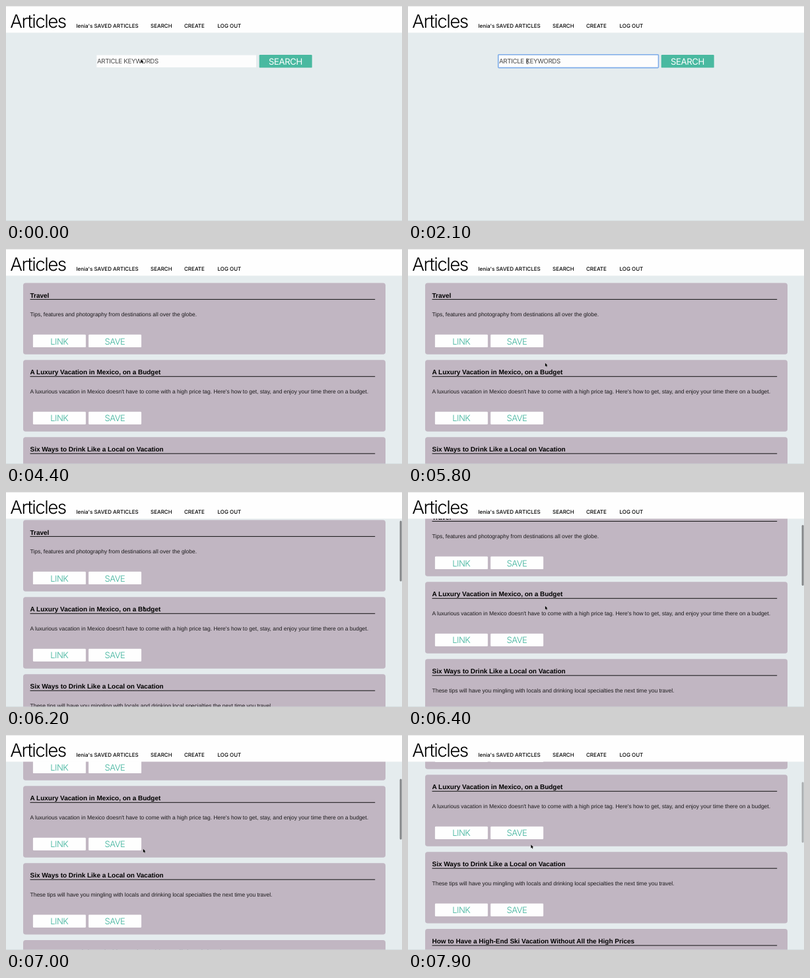
An HTML page that plays this animation: 600 by 326 pixels, repeating every 8 s.

```html
<!DOCTYPE html>
<html lang="en">
<head>
<meta charset="utf-8">
<title>Articles</title>
<style>
  html, body { margin: 0; width: 100%; height: 100%; overflow: hidden; background: #e5ecee; }
  svg { display: block; width: 100vw; height: 100vh; }
  text { font-family: Inter, Roboto, sans-serif; text-rendering: geometricPrecision; white-space: pre; }
  .logo { font-size: 27.8px; font-weight: 300; letter-spacing: -1.5px; }
  .nav { font-size: 8px; font-weight: 450; }
  .field { font-size: 9.7px; letter-spacing: -.33px; }
  .button { font-size: 13.2px; letter-spacing: -.45px; text-anchor: middle; }
  .card .button { fill: #3cb29b; font-size: 13px; letter-spacing: -.5px; font-weight: 350; }
  .title { font: bold 10px "Liberation Sans", Arial, sans-serif; letter-spacing: -.02px; }
  .text { font: 8.5px "Liberation Sans", Arial, sans-serif; letter-spacing: -.02px; fill: #1c1a1c; }
</style>
</head>
<body>
<svg viewBox="0 0 600 326">
  <rect width="600" height="326" fill="#e5ecee"/>
  <g id="search">
    <rect x="137.3" y="74.5" width="241.7" height="18.5" fill="#fdfdfd"/>
    <rect id="ring" x="136.7" y="73.8" width="242.8" height="19.8" rx="1" fill="none" stroke="#7fade9" stroke-width="1.6"/>
    <text id="hint" class="field" x="138" y="87.3" fill="#4c4c4c">ARTICLE KEYWORDS</text>
    <text id="typed" class="field" x="138" y="87.3"></text>
    <rect id="caret" y="78" width=".8" height="12"/>
    <rect x="383.7" y="74.1" width="80" height="19.5" rx="1.2" fill="#49b9a0"/>
    <text class="button" x="423.4" y="88.6" fill="#fff">SEARCH</text>
  </g>
  <g id="list"></g>
  <rect id="thumb" x="596.6" width="3" height="92" rx="1.5" fill="#858789"/>
  <rect width="600" height="40.5" fill="#fefefe"/>
  <rect width="600" height=".8" fill="#e3e3e3"/>
  <text class="logo" x="6.3" y="33">Articles</text>
  <g class="nav">
    <text x="106.5" y="32.6">lenia's SAVED ARTICLES</text>
    <text x="219" y="32.6">SEARCH</text>
    <text x="270" y="32.6">CREATE</text>
    <text x="320.5" y="32.6">LOG OUT</text>
  </g>
  <rect y="325.4" width="600" height=".6" fill="#ced5d7"/>
  <path id="arrow" d="M0 0V5.4L1.3 4.3L2.2 6.3L3.1 5.9L2.2 4H3.9Z" stroke="#fff" stroke-width=".5" paint-order="stroke"/>
  <path id="beam" d="M-1.3 -4Q0 -4 0 -3Q0 -4 1.3 -4M0 -3V3M-1.3 4Q0 4 0 3Q0 4 1.3 4" fill="none" stroke="#222" stroke-width=".7"/>
</svg>
<script>
const LOOP = 8000, STEP = 100, PITCH = 116.9;
const $ = id => document.getElementById(id);
const show = (id, on) => $(id).setAttribute('visibility', on ? 'visible' : 'hidden');
const move = (id, x, y) => $(id).setAttribute('transform', `translate(${x} ${y})`);

const articles = [
  ['Travel', 'Tips, features and photography from destinations all over the globe.'],
  ['A Luxury Vacation in Mexico, on a Budget', "A luxurious vacation in Mexico doesn't have to come with a high price tag. Here's how to get, stay, and enjoy your time there on a budget."],
  ['Six Ways to Drink Like a Local on Vacation', 'These tips will have you mingling with locals and drinking local specialties the next time you travel.'],
  ['How to Have a High-End Ski Vacation Without All the High Prices', '']
];

const button = (x, label) => `
  <rect x="${x}" y="129.8" width="80" height="19.3" rx="1.2" fill="#fefefe"/>
  <text class="button" x="${x + 39.8}" y="144.5">${label}</text>`;

$('list').innerHTML = articles.map(([title, text], i) => `
  <g class="card" transform="translate(0 ${i * PITCH})">
    <rect x="26" y="51.4" width="549" height="108.4" rx="3.8" fill="#c1b6c2"/>
    <text class="title" x="36.5" y="73.6">${title}</text>
    <rect x="36.5" y="75.9" width="522.7" height="1" fill="#111"/>
    <text class="text" x="36.5" y="102.2">${text}</text>
    ${button(40.9, 'LINK')}${button(125.1, 'SAVE')}
  </g>`).join('');

// Each key is [time, value, ...]; values between keys are linear.
function track(keys, t) {
  const n = keys.findIndex(k => k[0] > t);
  if (n === 0) return keys[0].slice(1);
  if (n < 0) return keys[keys.length - 1].slice(1);
  const a = keys[n - 1], b = keys[n], p = (t - a[0]) / (b[0] - a[0]);
  return a.slice(1).map((v, i) => v + (b[i + 1] - v) * p);
}

const pointer = [
  [300, 204.5, 81], [800, 232, 28], [1200, 222, 26], [1600, 181, 83.5],
  [5200, 181, 86], [5500, 217, 215], [5800, 207.8, 172.8],
  [7700, 207.8, 172.8], [7900, 186.3, 166.3]
];
const scroll = [[6000, 0], [6200, 9], [6400, 32], [6700, 67], [7000, 91], [7200, 104], [7300, 108]];
const keyTimes = [2500, 2800, 2900, 3400, 3800, 3900];

function draw(t) {
  const results = t >= 4200;
  show('search', !results);
  show('list', results);

  const typed = 'travel'.slice(0, keyTimes.filter(k => k <= t).length);
  const focused = !results && t >= 1500;
  show('ring', focused);
  show('hint', !results && !typed);
  $('typed').textContent = results ? '' : typed;
  show('caret', focused && (typed || t < 2100));
  $('caret').setAttribute('x', 138 + (typed ? $('typed').getComputedTextLength() : 0));

  const [top] = track(scroll, t);
  move('list', 0, -top);
  $('thumb').setAttribute('y', 41 + top * .28);
  $('thumb').setAttribute('opacity', t < 7800 ? 1 : t < 7900 ? .8 : .6);
  show('thumb', t >= 6100);

  const [x, y] = track(pointer, t);
  move('arrow', x, y);
  move('beam', x, y);
  show('beam', t >= 1500 && t < 2500);
  show('arrow', t < 1500 || t >= 5300);
}

const start = performance.now();
function tick() {
  const t = (performance.now() - start) % LOOP;
  draw(Math.floor(t / STEP) * STEP);
  requestAnimationFrame(tick);
}
tick();
</script>
</body>
</html>
```
